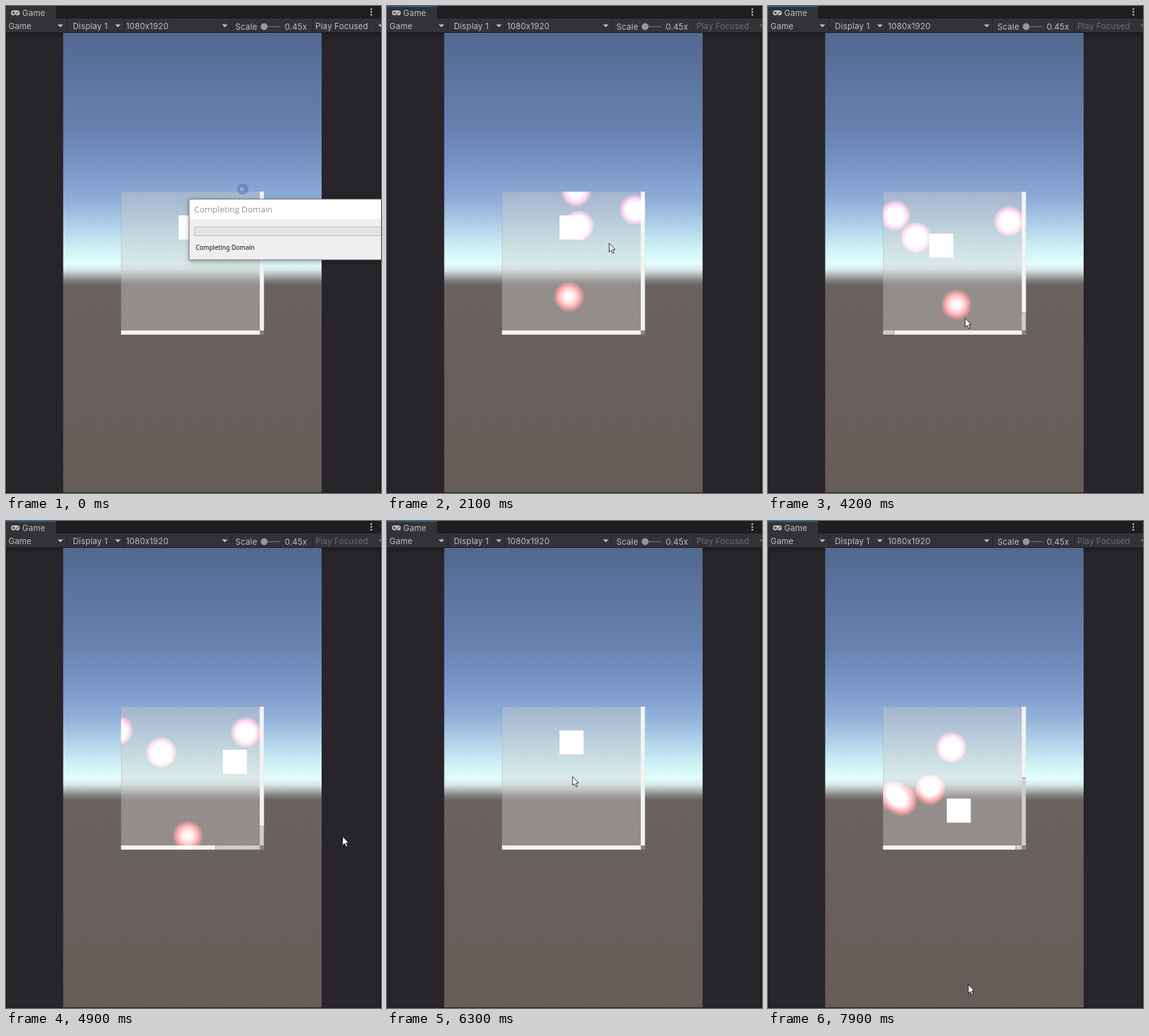
An HTML page with a canvas for the animation above (8000 ms loop, 600 by 779 pixels).

```html
<!DOCTYPE html>
<html lang="en">
<head>
<meta charset="utf-8">
<title>Scroll view with particles</title>
<style>
  html, body { margin: 0; width: 100%; height: 100%; overflow: hidden; background: #272529; }
  canvas { display: block; }
</style>
</head>
<body>
<canvas id="stage" width="600" height="779"></canvas>
<script>
const ctx = document.getElementById('stage').getContext('2d');
const LOOP = 8000, STEP = 100, PLAY = 700, DIALOG_END = 300;
const VIEW = { x: 184, y: 297, size: 222, bar: 6.5 };
const TEXT = '#bfbfc0', MUTED = '#6e6c6f', TOOLBAR = '#343236', EDGE = '#1b1a1c';

// Pointer turning points: time, x, y.
const pointer = [
  [0, 371, 284], [2100, 355, 379], [2450, 350, 438], [3400, 55, 469], [3600, 20, 480],
  [4200, 315, 499], [5000, 570, 505], [5400, 570, 500], [5600, 292, 468],
  [7000, 301, 349], [7900, 320, 741]
];
const drags = [{ from: 2450, to: 5400 }, { from: 6950, to: LOOP }];

// Particles come in evenly timed waves; each has a mid-life place and a velocity per second.
const WAVE = { first: 2750, every: 2350, halfLife: 1150, fade: 200, radius: 25 };
const waves = [
  [[393, 340, -5, 22], [297, 463, 9, -3], [292, 348, -23, -5], [324, 319, 33, 35], [203, 294, 0, 35], [194, 439, 60, 0]],
  [[383, 336, -3, -9], [288, 511, -15, 37], [252, 370, 17, 0], [172, 335, -35, 0]],
  [[244, 379, 34, 114], [263, 366, 67, -9], [206, 457, 19, -20], [178, 440, 49, 0]]
];

const clamp = (v, lo, hi) => Math.min(hi, Math.max(lo, v));

function along(path, t) {
  const i = clamp(path.findIndex(p => p[0] >= t), 1, path.length - 1);
  const [t0, x0, y0] = path[i - 1], [t1, x1, y1] = path[i];
  const k = clamp((t - t0) / (t1 - t0), 0, 1);
  return { x: x0 + (x1 - x0) * k, y: y0 + (y1 - y0) * k };
}

function rubber(d) {
  return Math.sign(d) * (1 - 1 / (Math.abs(d) * 0.55 / VIEW.size + 1)) * VIEW.size;
}

// Elastic offset while dragging, damped return after release.
function scrollOffset(t) {
  const drag = drags.filter(d => t >= d.from).pop();
  if (!drag) return { x: 0, y: 0 };
  const grab = along(pointer, drag.from);
  const tip = along(pointer, Math.min(t, drag.to));
  const s = Math.max(0, t - drag.to) / 50;
  const k = (1 + s) * Math.exp(-s);
  return { x: Math.round(rubber(tip.x - grab.x) * k), y: Math.round(rubber(tip.y - grab.y) * k) };
}

function rect(x, y, w, h, color) {
  ctx.fillStyle = color;
  ctx.fillRect(x, y, w, h);
}

function disc(x, y, r, color) {
  ctx.fillStyle = color;
  ctx.beginPath();
  ctx.arc(x, y, r, 0, 7);
  ctx.fill();
}

function polygon(points, color) {
  ctx.fillStyle = color;
  ctx.beginPath();
  points.forEach(([x, y]) => ctx.lineTo(x, y));
  ctx.closePath();
  ctx.fill();
}

function label(text, x, y, color = TEXT, font = '13px Inter, sans-serif', spacing = 0.2) {
  ctx.font = font;
  ctx.letterSpacing = spacing + 'px';
  ctx.fillStyle = color;
  ctx.fillText(text, x, y);
}

function gradient(y0, y1, stops) {
  const g = ctx.createLinearGradient(0, y0, 0, y1);
  stops.forEach(([y, color]) => g.addColorStop((y - y0) / (y1 - y0), color));
  return g;
}

const sky = gradient(43, 779, [
  [43, '#51688f'], [200, '#6882b0'], [260, '#7996c6'], [310, '#8eaed8'], [350, '#add0e8'],
  [385, '#cceff6'], [412, '#e2fefd'], [422, '#d5e8e7'], [432, '#a8adac'], [440, '#7e7b79'],
  [447, '#69625f'], [779, '#665d58']
]);

function drawGamepad() {
  ctx.fillStyle = TEXT;
  ctx.beginPath();
  ctx.roundRect(8, 7, 14, 8, 4);
  ctx.fill();
  polygon([[12, 16], [15, 13], [18, 16]], TOOLBAR);
  rect(10, 10.3, 4, 1.3, TOOLBAR);
  rect(11.4, 9, 1.3, 4, TOOLBAR);
  disc(17, 12, 0.9, TOOLBAR);
  disc(19, 10, 0.9, TOOLBAR);
}

function drawEditor(playing) {
  const focusColor = playing ? MUTED : TEXT;
  rect(0, 0, 600, 779, '#272529');
  rect(0, 0, 600, 20, '#1f1d20');
  rect(0, 0, 80, 20, TOOLBAR);
  if (playing) rect(0, 0, 80, 2, '#29506f');
  rect(0, 20, 600, 22, TOOLBAR);
  drawGamepad();
  label('Game', 26, 15.5);
  [5, 9.5, 14].forEach(y => disc(584.5, y, 1.4, TEXT));

  label('Game', 4, 37);
  label('Display 1', 107, 37);
  label('1080x1920', 192, 37);
  label('Scale', 367, 38);
  label('0.45x', 446, 38);
  label('Play Focused', 495, 37, focusColor);
  [97, 188, 359, 490].forEach(x => rect(x, 20, 1, 22, '#232124'));
  [87, 179, 350, 600].forEach(x =>
    polygon([[x - 4.5, 29.5], [x + 4.5, 29.5], [x, 34]], x === 600 ? focusColor : TEXT));
  rect(413, 32, 26, 2, '#5d5b5e');
  disc(413, 33, 5.5, '#969597');

  rect(0, 42, 600, 2, EDGE);
  rect(0, 44, 600, 10, gradient(44, 54, [[44, '#201e21'], [54, '#272529']]));
  rect(0, 42, 1, 737, EDGE);
  rect(598, 42, 2, 737, EDGE);
  rect(91.5, 43, 413.5, 735, sky);
  rect(0, 778, 600, 1, EDGE);
}

function drawParticle(x, y) {
  const g = ctx.createRadialGradient(x, y, 0, x, y, WAVE.radius);
  g.addColorStop(0, 'rgb(108,114,120)');
  g.addColorStop(0.3, 'rgb(112,100,104)');
  g.addColorStop(0.55, 'rgb(112,60,64)');
  g.addColorStop(0.75, 'rgb(95,18,22)');
  g.addColorStop(1, 'rgb(0,0,0)');
  disc(x, y, WAVE.radius, g);
}

function drawParticles(t) {
  ctx.globalCompositeOperation = 'lighter';
  waves.forEach((wave, i) => {
    const age = t - WAVE.first - i * WAVE.every;
    ctx.globalAlpha = clamp((WAVE.halfLife - Math.abs(age)) / WAVE.fade, 0, 1);
    wave.forEach(([x, y, vx, vy]) => drawParticle(x + vx * age / 1000, y + vy * age / 1000));
  });
  ctx.globalAlpha = 1;
  ctx.globalCompositeOperation = 'source-over';
}

function drawScrollView(t) {
  const { x, y, size, bar } = VIEW, edge = size + bar;
  const off = scrollOffset(t);
  const w = size - Math.abs(off.x), h = size - Math.abs(off.y);
  rect(x, y, edge, edge, 'rgba(205,202,200,.42)');
  ctx.strokeStyle = 'rgba(110,115,125,.2)';
  ctx.lineWidth = 1;
  ctx.strokeRect(x + 0.5, y + 0.5, size, size);

  rect(x, y + size, size, bar, '#cecbca');
  rect(x + size, y, bar, size, '#cecdcd');
  rect(x + Math.max(0, -off.x), y + size, w, bar, '#f3f2f2');
  rect(x + size, y + Math.max(0, -off.y), bar, h, '#f3f3f4');
  // Thin line where a handle meets its track.
  if (off.x) rect(off.x < 0 ? x - off.x - 1 : x + w, y + size, 1, bar, '#9e9b9a');
  if (off.y) rect(x + size, off.y < 0 ? y - off.y - 1 : y + h, bar, 1, '#9e9b9a');
  rect(x + size, y + size, bar, bar, '#898482');

  ctx.save();
  ctx.beginPath();
  ctx.rect(x, y, edge, edge);
  ctx.clip();
  drawParticles(t);
  rect(276 + off.x, 335 + off.y, 38.5, 38.5, '#fff');
  ctx.restore();
}

function drawDialog() {
  ctx.save();
  ctx.shadowColor = 'rgba(0,0,0,.35)';
  ctx.shadowBlur = 8;
  ctx.shadowOffsetY = 2;
  rect(292.5, 308.5, 320, 98, '#707173');
  ctx.restore();
  rect(293.5, 309.5, 320, 32, '#fff');
  rect(293.5, 341, 320, 64.5, '#f0eff0');
  label('Completing Domain', 301, 330, '#929294', '13.5px "Open Sans", sans-serif', 0);
  rect(301, 353, 310, 15, '#b9b9bb');
  rect(302, 354, 310, 13, '#e4e4e6');
  label('Completing Domain', 303.5, 389.5, '#111', '500 10px "Noto Sans", sans-serif', 0);
}

function drawBusy({ x, y }) {
  disc(x + 8, y + 9, 9, 'rgba(72,112,172,.5)');
  disc(x + 8, y + 9, 5, 'rgba(110,145,195,.6)');
  rect(x + 3, y + 6, 6, 6, 'rgba(165,195,230,.5)');
}

function drawArrow({ x, y }) {
  ctx.save();
  ctx.translate(x, y);
  polygon([[0.5, 0.5], [0.5, 14.5], [3.7, 11.6], [6, 16.8], [8.2, 15.8], [6, 10.8], [10, 10.5]], '#fff');
  ctx.strokeStyle = '#222';
  ctx.lineWidth = 1;
  ctx.stroke();
  ctx.restore();
}

function draw(now) {
  const t = Math.floor(now % LOOP / STEP) * STEP;
  drawEditor(t >= PLAY);
  drawScrollView(t);
  if (t < DIALOG_END) drawDialog();
  (t < PLAY ? drawBusy : drawArrow)(along(pointer, t));
  requestAnimationFrame(draw);
}
requestAnimationFrame(draw);
</script>
</body>
</html>
```
